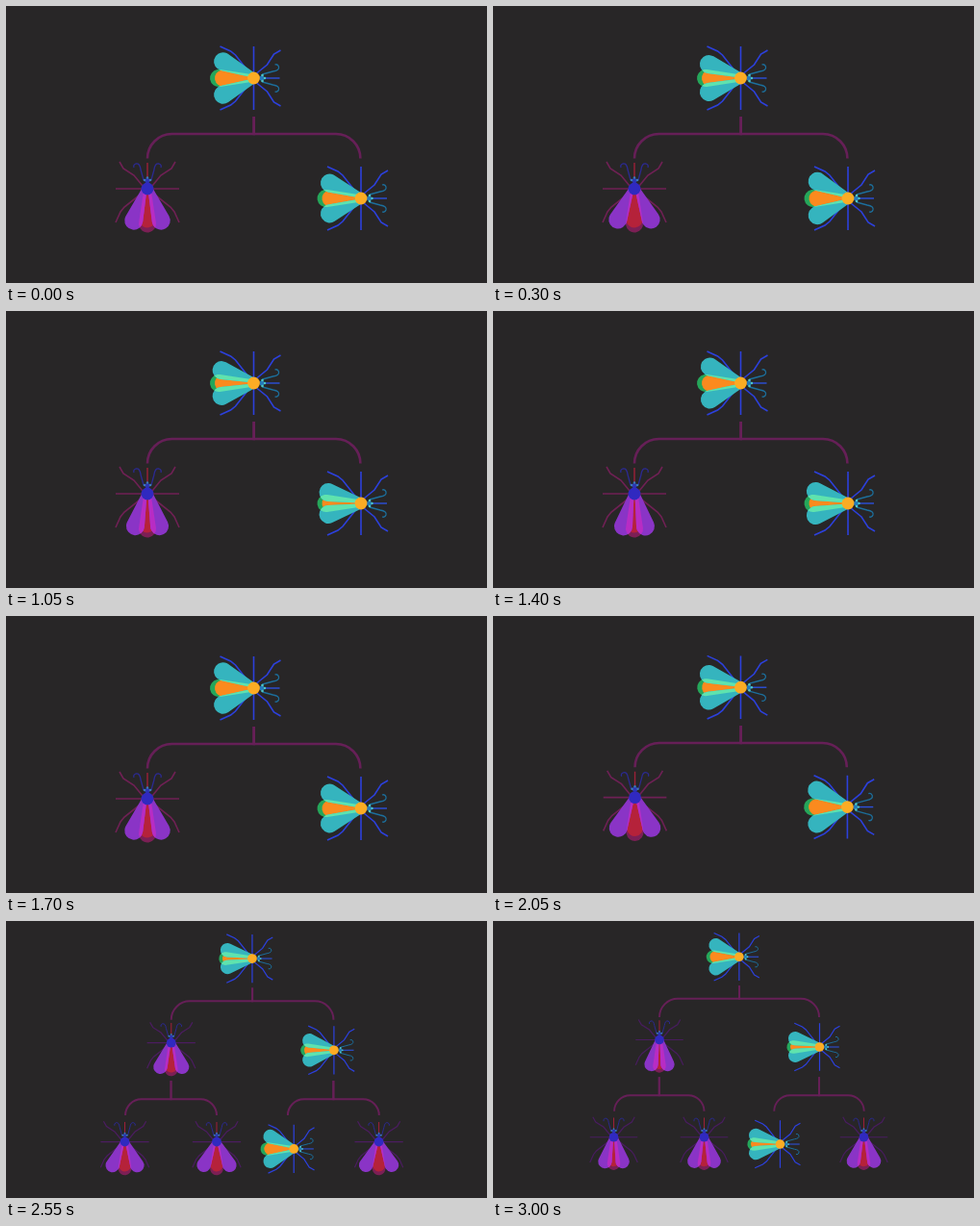
These frames come from a looping animation (500x288 px, 3.05 s). An HTML page with a canvas:

```html
<!DOCTYPE html>
<html>
<head>
<meta charset="utf-8">
<style>
html, body { margin: 0; width: 100%; height: 100%; overflow: hidden; background: #282627; }
canvas { display: block; }
</style>
</head>
<body>
<canvas id="stage" width="500" height="288"></canvas>
<script>
const ctx = document.getElementById('stage').getContext('2d');
const LOOP = 3050, STEP = 50, FLAP = 1700, TAU = Math.PI * 2;

const CYAN = {
  turn: 0, leg: () => '#2c40dc', feeler: '#1c6f9c', beak: '#2c50dc', head: '#2478b8', eye: '#4cc8c8',
  tail: '#25a65a', belly: '#fb8a1e', wing: '#35b4be', glaze: '#5fe3ae', thorax: '#fbac24'
};
const PURPLE = {
  turn: -Math.PI / 2, leg: p => `hsl(${320 - 40 * p} 55% ${28 - 4 * p}%)`, feeler: '#2b2a90', beak: '#9c2038',
  head: '#2c34b4', eye: '#3a78b8', tail: '#7c1f55', belly: '#b5223a', wing: '#8a34c6', glaze: '#b82cc4', thorax: '#3029c0'
};

// x, y of the thorax, colours, and the time at which the wings are widest
const bugs = [
  [257.5, 75, CYAN, 1570],
  [147, 190, PURPLE, 450],
  [369, 200, CYAN, 300],
  [83.7, 325, PURPLE, 650],
  [209, 325, PURPLE, 800],
  [314.3, 334.7, CYAN, 650],
  [430.3, 325, PURPLE, 850]
];

// Outline around a small circle at (0, y) and a larger one at distance d
function petal(path, y, angle, d, r0, r1) {
  const h = Math.acos((r1 - r0) / d), back = angle + Math.PI;
  path.moveTo(r0 * Math.cos(back - h), y + r0 * Math.sin(back - h));
  path.arc(0, y, r0, back - h, back + h);
  path.arc(d * Math.cos(angle), y + d * Math.sin(angle), r1, back + h - TAU, back - h);
  path.closePath();
  return path;
}

const tail = petal(new Path2D(), 0, Math.PI, 36.5, 3.5, 9);
const belly = petal(new Path2D(), 0, Math.PI, 32, 3, 8.5);
const legs = new Path2D('M0 0V-33 M3 -5L14 -14L21 -25L28 -29 M-4 -5L-19 -24L-24 -28L-35 -33');
const feeler = new Path2D('M9 -4L20 -7Q27 -8 26 -12Q25 -15 22 -14');
const beak = new Path2D('M11 0H27');

function fill(path, color) {
  ctx.fillStyle = color;
  ctx.fill(path);
}

function stroke(path, color, width) {
  ctx.strokeStyle = color;
  ctx.lineWidth = width;
  ctx.stroke(path);
}

function dot(x, y, r, color) {
  const path = new Path2D();
  path.arc(x, y, r, 0, TAU);
  fill(path, color);
}

function drawBug([x, y, look, peak], t, p) {
  ctx.save();
  ctx.translate(x, y);
  ctx.rotate(look.turn);
  for (const side of [1, -1]) {
    ctx.save();
    ctx.scale(1, side);
    stroke(legs, look.leg(p), 1.6);
    stroke(feeler, look.feeler, 1.3);
    ctx.restore();
  }
  stroke(beak, look.beak, 1.4);

  const spread = (19.2 + 5.5 * Math.cos(TAU * (t - peak) / FLAP)) * Math.PI / 180;
  const wings = new Path2D();
  petal(wings, 3, Math.PI - spread, 35, 2.5, 9.5);
  petal(wings, -3, Math.PI + spread, 35, 2.5, 9.5);
  fill(tail, look.tail);
  fill(belly, look.belly);
  fill(wings, look.wing);
  ctx.save();
  ctx.clip(tail);
  fill(wings, look.glaze);
  ctx.restore();

  dot(8.5, 0, 2.6, look.head);
  dot(9, -3, 1.3, look.eye);
  dot(9, 3, 1.3, look.eye);
  dot(11.5, 0, 1.2, look.eye);
  dot(0, 0, 6.4, look.thorax);
  ctx.restore();
}

// Stem that splits into two rounded arms, drawn up to the given share
function fork(x, top, bar, half, r, share) {
  if (share <= 0) return;
  const stem = bar - top;
  const total = stem + half - r + r * Math.PI / 2;
  ctx.setLineDash([total * share, total * 2]);
  for (const side of [1, -1]) {
    const path = new Path2D();
    path.moveTo(x, top);
    path.lineTo(x, bar);
    path.lineTo(x + side * (half - r), bar);
    path.arcTo(x + side * half, bar, x + side * half, bar + r, r);
    stroke(path, '#661f57', 2.6);
  }
  ctx.setLineDash([]);
}

// Camera progress: slow start, quick settle
function zoom(t) {
  const u = Math.min(1, Math.max(0, (t - 1850) / 800));
  return u ? 1 / (1 + 4 * ((1 - u) / u) ** 2.25) : 0;
}

function draw() {
  const t = Math.floor(performance.now() % LOOP / STEP) * STEP;
  const p = zoom(t), s = 1 - 0.25 * p;
  const grow = Math.min(1, (t - 2250) / 250);
  ctx.setTransform(1, 0, 0, 1, 0, 0);
  ctx.fillStyle = '#282627';
  ctx.fillRect(0, 0, 500, 288);
  ctx.setTransform(s, 0, 0, s, 62.75 * p, -19 * p);
  fork(257.7, 115, 133, 110.7, 25.5, 1);
  fork(146.7, 241.5, 267, 62.3, 22, grow);
  fork(368.3, 241.5, 267, 62.3, 22, grow);
  for (const bug of bugs) drawBug(bug, t, p);
  requestAnimationFrame(draw);
}
draw();
</script>
</body>
</html>
```
